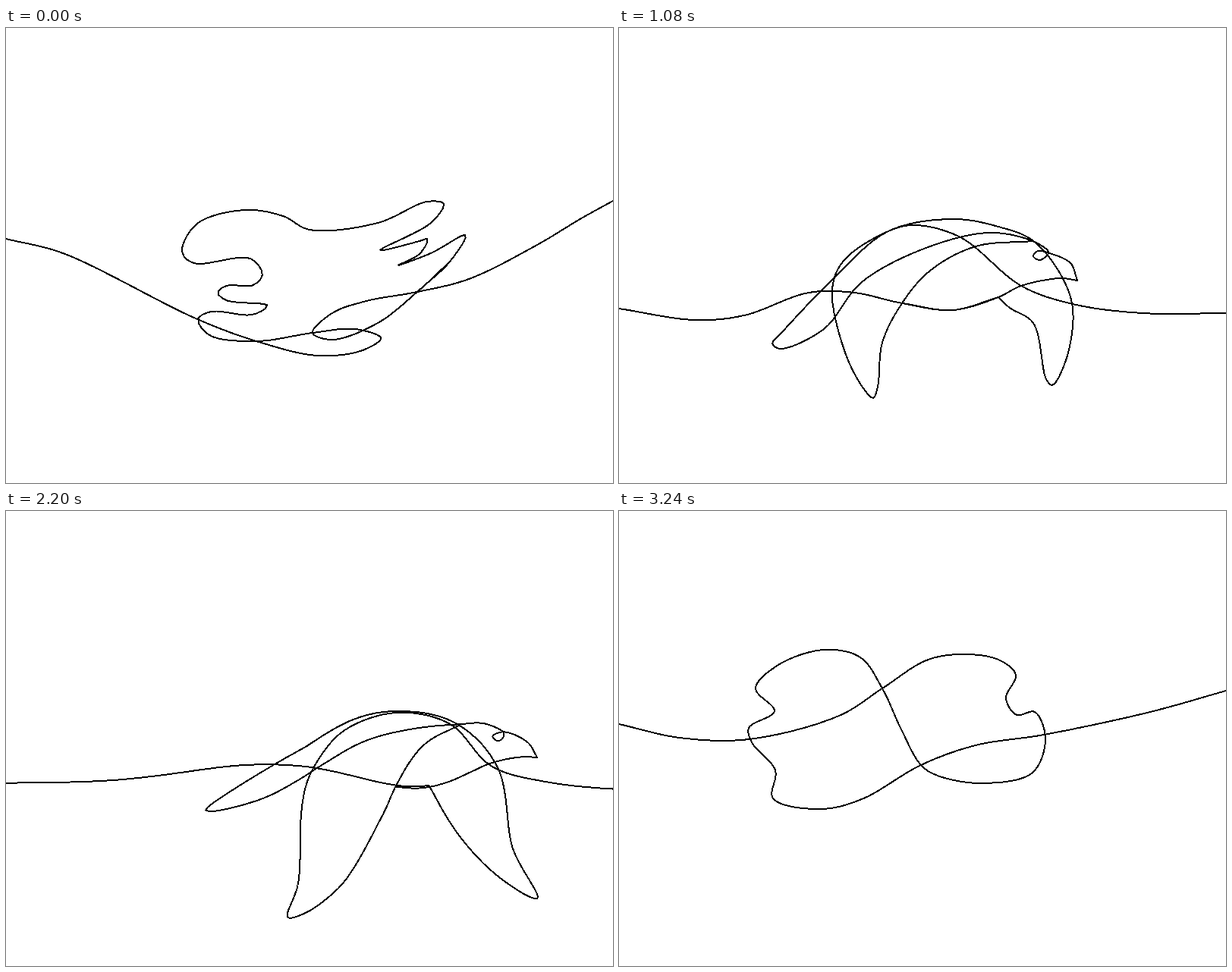
An HTML page for the animation above (3.28 s loop, 800 by 600 pixels).

```html
<!DOCTYPE html>
<html lang="en">
<head>
<meta charset="utf-8">
<title>One line</title>
<style>
html, body { margin: 0; width: 100%; height: 100%; overflow: hidden; background: #fff; }
svg { display: block; width: 100vw; height: 100vh; }
path { fill: none; stroke: #000; stroke-width: 2; stroke-linejoin: round; shape-rendering: crispEdges; }
</style>
</head>
<body>
<svg viewBox="0 0 800 600"><path id="line"/></svg>
<script>
const LOOP = 3280, STEP = 40, SWAP = 2800;

// Key points of two strands per pose. Landmarks that correspond between
// poses end with "|" where the line runs on smoothly and "/" at a corner.
const HANDS = [
  `0,278 75,297 250,383 330,413 411,432|470,425 494,409|460,397 404,402|330,413 268,405 253,384 270,374 325,378
   345,366 290,359 279,349 290,340 326,339 338,325 322,304 247,310 232,295|252,258 315,240 365,248 400,266|490,257|
   555,229 577,232|560,257 493,293 545,281 556,278 545,298 516,313 560,297 606,273 585,308 542,348`,
  `585,308 542,348|490,389 430,411 404,402|430,376 475,360|542,348|610,331 700,286 760,250 800,228`];

const SPREAD = [
  `0,259 38,295 95,383 225,478 300,499 370,503|460,488 518,448|447,398|405,411 370,458 340,500 305,525 297,513
   328,468 331,480 305,505 242,534 262,489 325,433 262,489 205,507 176,499|225,478 270,443 345,350 418,317|
   465,333 490,372|523,440 565,488 594,522|577,528 545,516 497,474 488,456 495,452 523,512 508,537 484,512 477,450
   468,395`,
  `477,450 468,395|455,371 418,361 368,381 345,430|370,470 424,496|500,499 565,488|635,452 700,371 765,262 800,220`];

const UP = [
  `0,358 100,356 200,348 258,354 320,372 395,383 435,376|465,355 484,322 540,185 590,110|580,107 545,142 490,220
   450,292|430,313 340,326 258,354 195,363 178,377|208,385 320,371 390,355 478,319|520,317 568,329 566,338 553,340
   548,334 560,328|583,336 600,355/580,356 552,366 490,375 435,377`,
  `484,322 465,355 435,377|385,357 300,293 255,235 223,176|234,169 280,192 330,202 390,235 450,292|484,324 548,366|
   620,382 700,386 800,379`];

const DOWN = [
  `0,357 100,355 240,343 317,351 425,376 455,377/500,445 555,488 610,508|567,448 547,350 495,296|425,281 365,290
   267,345 200,398|250,388 317,351 380,318 495,296|530,293 562,305 560,316 551,318 545,312 560,305|592,319 605,338/
   583,338 545,346 490,369 455,377 425,376`,
  `495,296 455,325 425,376|405,415 343,502 273,536|289,493 302,395 317,351 355,303 425,281|495,296 547,350|
   620,370 740,380 800,378`];

const RISE = [
  `0,370 100,385 165,379 250,349 310,349 373,363 440,372 500,355/515,369 546,389 563,463 571,471|590,435 598,370
   582,325 545,280 500,262|440,252 355,268 283,330 215,401 202,416|212,423 270,397 320,335 410,288 490,270 545,281|
   566,296 555,306 546,301 552,294 567,297|595,310 604,333/582,330 530,340 500,355 440,372 373,363`,
  `545,281 470,288 410,320 373,363|347,415 341,473 335,488|322,475 298,428 281,345 296,307 355,268 390,260|
   450,276 530,340|598,364 690,376 800,376`];

const LEAVE = [
  `0,355 200,337 450,283 600,263 697,275 735,297 775,345 840,385|930,320 1020,110|885,285|800,278 745,269 640,285
   611,306|628,321 720,301 800,305 900,318|980,325|1030,355|900,340 800,278 776,271`,
  `800,278 776,271/776,220 772,170 761,124|800,153 885,285|980,366|1230,380`];

const KNOT = `0,281 80,299 171,301 290,270 347,234 405,197 450,189 500,196 523,216 510,247 524,269 548,265 562,300
  545,345 480,359 420,349 398,335 372,288 347,234 318,193 270,183 210,203 180,234 205,264 171,286 175,305 206,342
  203,379 265,393 320,380 398,335 470,309 560,295 700,265 800,237`;

const mix = (a, b, k) => [a[0] + (b[0] - a[0]) * k, a[1] + (b[1] - a[1]) * k];
const dist = (a, b) => Math.hypot(b[0] - a[0], b[1] - a[1]);

// Centripetal Catmull-Rom between b and c.
function curve(a, b, c, d, k) {
  const gap = (p, q) => Math.sqrt(Math.max(dist(p, q), 0.01));
  const t1 = gap(a, b), t2 = t1 + gap(b, c), t3 = t2 + gap(c, d);
  const t = t1 + (t2 - t1) * k;
  const p = mix(a, b, t / t1);
  const q = mix(b, c, k);
  const r = mix(c, d, (t - t2) / (t3 - t2));
  return mix(mix(p, q, t / t2), mix(q, r, (t - t1) / (t3 - t1)), k);
}

// n points at equal distances along a polyline.
function spread(pts, n) {
  const len = [0];
  for (let i = 1; i < pts.length; i++) len.push(len[i - 1] + dist(pts[i - 1], pts[i]));
  const total = len[len.length - 1], out = [];
  for (let i = 1, j = 1; i <= n; i++) {
    const want = total * i / n;
    while (j < pts.length - 1 && len[j] < want) j++;
    out.push(mix(pts[j - 1], pts[j], Math.min(1, (want - len[j - 1]) / (len[j] - len[j - 1] || 1))));
  }
  return out;
}

const parse = text => text.trim().split(/\s+/).map(p => p.split(",").map(Number));

function strand(text, n) {
  const out = [];
  for (const run of text.split("/")) {
    const parts = run.split("|").map(parse);
    if (out.length) parts[0].unshift(out[out.length - 1]);
    const pts = parts.flat(), last = pts.length - 1;
    const ghost = (p, q) => mix(q, p, 2);
    const at = i => i < 0 ? ghost(pts[0], pts[1]) : i > last ? ghost(pts[last], pts[last - 1]) : pts[i];
    if (!out.length) out.push(pts[0]);
    let from = 0, end = -1;
    for (const part of parts) {
      end += part.length;
      const dense = [pts[from]];
      for (; from < end; from++)
        for (let s = 1; s <= 16; s++) dense.push(curve(at(from - 1), at(from), at(from + 1), at(from + 2), s / 16));
      out.push(...spread(dense, n));
    }
  }
  return out;
}

// Carries the bird along while the line stays fixed at the left edge.
const carry = (pose, dx, dy) => pose.map(pts => pts.map(([x, y]) => {
  const k = Math.max(0, Math.min(1, x / 300));
  return [x + dx * k, y + dy * k];
}));

const [hands, open, up, down, rise, leave] =
  [HANDS, SPREAD, UP, DOWN, RISE, LEAVE].map(pose => pose.map(text => strand(text, 80)));

const KEYS = [[0, hands], [360, open]];
for (let beat = 600; beat < 1880; beat += 640) KEYS.push([beat, up], [beat + 280, down], [beat + 480, rise]);
KEYS.push([1880, up], [2160, carry(down, 75, -8)], [2360, carry(rise, 225, -30)], [2560, leave],
  [SWAP, carry(leave, 450, 0)]);

// Hermite motion through the poses, with slightly damped speeds.
function flight(t) {
  let i = 0;
  while (i < KEYS.length - 2 && t >= KEYS[i + 1][0]) i++;
  const key = j => KEYS[Math.max(0, Math.min(KEYS.length - 1, j))];
  const [a, b, c, d] = [key(i - 1), key(i), key(i + 1), key(i + 2)];
  const span = c[0] - b[0], k = (t - b[0]) / span, e = k * k * (3 - 2 * k), pull = 0.7 * span;
  const inK = pull * k * (1 - k) ** 2 / (c[0] - a[0]);
  const outK = pull * k * k * (k - 1) / (d[0] - b[0]);
  return b[1].map((pts, s) => pts.map((_, n) => [0, 1].map(v => {
    const [A, B, C, D] = [a, b, c, d].map(q => q[1][s][n][v]);
    return B + (C - B) * e + (C - A) * inK + (D - B) * outK;
  })));
}

const knot = strand(KNOT, 700);
const plain = knot.map((_, i) => {
  const u = i / (knot.length - 1);
  return [800 * u, 355 - 38 * u ** 1.4];
});

// The straight line overshoots a little as it ties itself.
function tie(t) {
  const k = (t - SWAP) / (LOOP - STEP - SWAP) - 1;
  const e = 1 + 2.5 * k ** 3 + 1.5 * k ** 2;
  return [plain.map((p, i) => mix(p, knot[i], e))];
}

const line = document.getElementById("line");
const toPath = pts => "M" + pts.map(p => p[0].toFixed(1) + " " + p[1].toFixed(1)).join("L");
const start = performance.now();
let shown = -1;

function tick() {
  const t = Math.floor((performance.now() - start) % LOOP / STEP) * STEP;
  if (t !== shown) {
    shown = t;
    line.setAttribute("d", (t < SWAP ? flight(t) : tie(t)).map(toPath).join(""));
  }
  requestAnimationFrame(tick);
}
tick();
</script>
</body>
</html>
```
